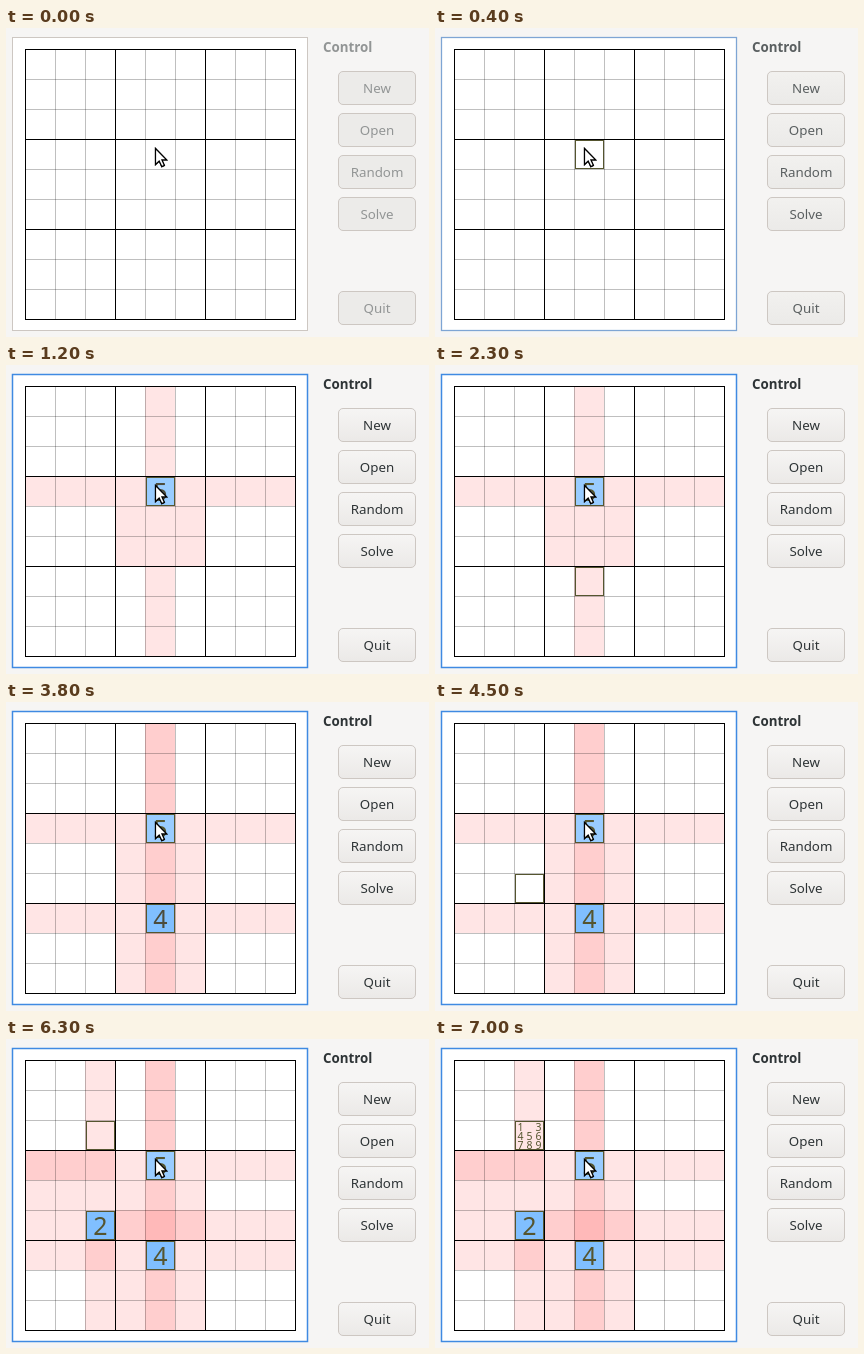
Recreate the animation shown at these times as an HTML page with a canvas. Size 423 by 309 pixels, loop 8000 ms.

```html
<!DOCTYPE html>
<html lang="en">
<head>
<meta charset="utf-8">
<title>Sudoku</title>
<style>
html, body { margin: 0; width: 100%; height: 100%; overflow: hidden; background: #f6f5f4; }
canvas { display: block; }
</style>
</head>
<body>
<canvas id="stage" width="423" height="309"></canvas>
<script>
const ctx = document.getElementById('stage').getContext('2d');
const LOOP = 8000, LEFT = 19, TOP = 21, CELL = 30;
const FONT = '"Noto Sans", sans-serif';

// [time, row, column]
const selections = [
  [400, 3, 4], [2100, 4, 4], [2200, 5, 4], [2300, 6, 4], [4000, 6, 3],
  [4100, 6, 2], [4500, 5, 2], [5800, 4, 2], [6000, 3, 2], [6300, 2, 2]
];
// [time, row, column, digit]
const entries = [[1200, 3, 4, 5], [3800, 6, 4, 4], [5500, 5, 2, 2]];
const notes = { time: 7000, row: 2, col: 2, digits: [1, 3, 4, 5, 6, 7, 8, 9] };
const buttons = [['New', 43], ['Open', 85], ['Random', 127], ['Solve', 169], ['Quit', 263]];

const cellX = col => LEFT + 1 + col * CELL;
const cellY = row => TOP + 1 + row * CELL;
const box = n => Math.floor(n / 3);

function mix(from, to, p) {
  return `rgb(${from.map((v, i) => Math.round(v + (to[i] - v) * p))})`;
}

function text(str, x, y, size, color, align = 'center', weight = 400) {
  ctx.font = `${weight} ${size}px ${FONT}`;
  ctx.textAlign = align;
  ctx.fillStyle = color;
  ctx.fillText(str, x, y);
}

function fillCell(row, col, color) {
  ctx.fillStyle = color;
  ctx.fillRect(cellX(col), cellY(row), CELL - 1, CELL - 1);
}

function outlineCell(row, col) {
  ctx.strokeStyle = '#55552f';
  ctx.lineWidth = 1;
  ctx.strokeRect(cellX(col) + .5, cellY(row) + .5, CELL - 2, CELL - 2);
}

function tintPeers(row, col) {
  ctx.fillStyle = 'rgba(255,0,0,.1)';
  for (let r = 0; r < 9; r++) {
    for (let c = 0; c < 9; c++) {
      const sameBox = box(r) === box(row) && box(c) === box(col);
      if (r === row || c === col || sameBox) {
        ctx.fillRect(LEFT + c * CELL, TOP + r * CELL, CELL, CELL);
      }
    }
  }
}

function drawLines(major) {
  ctx.fillStyle = major ? '#000' : 'rgba(0,0,0,.25)';
  for (let i = 0; i < 10; i++) {
    if ((i % 3 === 0) !== major) continue;
    ctx.fillRect(LEFT + i * CELL, TOP, 1, 271);
    ctx.fillRect(LEFT, TOP + i * CELL, 271, 1);
  }
}

function drawBoard(t, focus) {
  ctx.fillStyle = '#fff';
  ctx.fillRect(6, 9, 296, 294);
  ctx.strokeStyle = mix([205, 199, 194], [63, 138, 226], focus);
  ctx.lineWidth = 1 + focus * .5;
  ctx.strokeRect(6.5, 9.5, 295, 293);

  const placed = entries.filter(e => t >= e[0]);
  const selected = selections.filter(s => t >= s[0]).pop();
  placed.forEach(([, row, col]) => tintPeers(row, col));
  drawLines(false);
  drawLines(true);

  for (const [, row, col, digit] of placed) {
    const hovered = row === 3 && col === 4;
    const active = selected[1] === row && selected[2] === col;
    fillCell(row, col, hovered ? '#99ccff' : '#80bfff');
    outlineCell(row, col);
    text(digit, cellX(col) + 14.5, cellY(row) + 24, 25, active ? '#4c4c3c' : '#55552f');
  }
  if (t >= notes.time) {
    for (const d of notes.digits) {
      const x = cellX(notes.col) + 5.5 + (d - 1) % 3 * 9;
      text(d, x, cellY(notes.row) + 10 + box(d - 1) * 9, 10.5, '#55552f');
    }
  }
  if (selected) outlineCell(selected[1], selected[2]);
}

function drawControls(focus) {
  const ink = mix([146, 149, 149], [46, 52, 54], focus);
  text('Control', 317, 24, 13.33, ink, 'left', 700);
  for (const [label, y] of buttons) {
    const shade = ctx.createLinearGradient(0, y, 0, y + 34);
    shade.addColorStop(0, mix([236, 235, 233], [246, 245, 244], focus));
    shade.addColorStop(1, mix([236, 235, 233], [235, 233, 231], focus));
    ctx.beginPath();
    ctx.roundRect(332.5, y + .5, 77, 33, 4.5);
    ctx.fillStyle = shade;
    ctx.fill();
    ctx.strokeStyle = '#cdc7c2';
    ctx.lineWidth = 1;
    ctx.stroke();
    text(label, 371, y + 22, 13.33, ink);
  }
}

function drawPointer() {
  ctx.fillStyle = '#fff';
  ctx.strokeStyle = '#000';
  ctx.lineWidth = 1.2;
  ctx.stroke(pointer);
  ctx.fill(pointer);
  ctx.stroke(pointer);
}
const pointer = new Path2D('M149.5 120.5V136.5L153.2 133L155.8 138.6L158.4 137.4L155.9 131.9H160.6Z');

function draw() {
  const t = performance.now() % LOOP;
  const step = Math.max(0, Math.min(3, Math.floor((t - 300) / 100)));
  const focus = 1 - (1 - step / 3) ** 2;
  ctx.fillStyle = '#f6f5f4';
  ctx.fillRect(0, 0, 423, 309);
  drawBoard(t, focus);
  drawControls(focus);
  drawPointer();
  requestAnimationFrame(draw);
}
draw();
</script>
</body>
</html>
```
